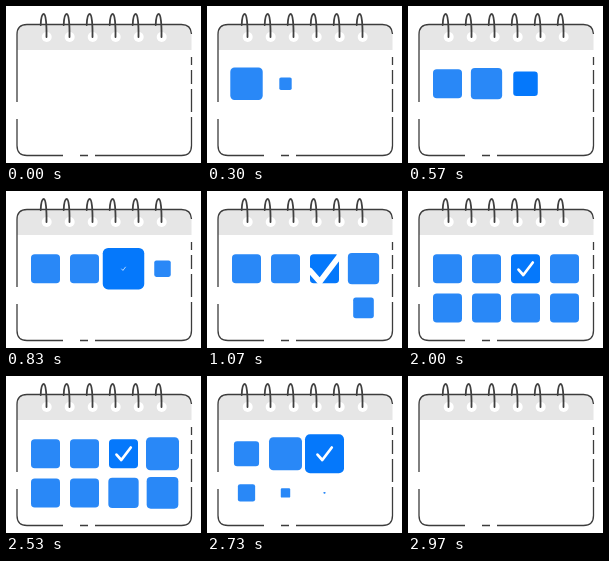
An HTML page that plays this animation: 195 by 157 pixels, repeating every 3010 ms.

```html
<!DOCTYPE html>
<html lang="en">
<head>
<meta charset="utf-8">
<title>Calendar</title>
<style>
  html, body { margin: 0; width: 100%; height: 100%; overflow: hidden; background: #fff; }
  svg { display: block; width: 195px; height: 157px; }
</style>
</head>
<body>
<svg viewBox="0 0 195 157" fill="none" stroke-linecap="round" stroke-linejoin="round">
  <path d="M11 44V28.500Q11 18.500 21 18.500H175.500Q185.500 18.500 185.500 28.500V44Z" fill="#e6e6e6"/>
  <g stroke="#3c3c3c" stroke-width="1.3" stroke-linecap="butt">
    <path d="M11 96V28.500Q11 18.500 21 18.500H175.500Q185 18.500 185.500 28"/>
    <path d="M185.500 51V59M185.500 64V78M185.500 83V106"/>
    <path d="M185.500 111V139.500Q185.500 149.500 175.500 149.500H89"/>
    <path d="M82 149.500H74M57 149.500H21Q11 149.500 11 139.500V113"/>
  </g>
  <g id="rings"></g>
  <g id="days"></g>
  <path id="tick" d="M-7 .8L-2.200 6.200L7.300 -6.300" stroke="#fff" stroke-width="2.700"/>
</svg>
<script>
const NS = 'http://www.w3.org/2000/svg';
const LOOP = 3010, STEP = 100 / 3, LAST = 89;
const SIZE = 29, PEAK = 33, BIG = 49;

function add(parent, tag, attrs) {
  const el = document.createElementNS(NS, tag);
  for (const key in attrs) el.setAttribute(key, attrs[key]);
  return document.getElementById(parent).appendChild(el);
}

// Linear interpolation through [step, value] pairs.
function track(keys, k) {
  if (k <= keys[0][0]) return keys[0][1];
  for (let i = 1; i < keys.length; i++) {
    const [a, from] = keys[i - 1], [b, to] = keys[i];
    if (k <= b) return from + (to - from) * (k - a) / (b - a);
  }
  return keys[keys.length - 1][1];
}

for (let i = 0; i < 6; i++) {
  const x = 40.7 + 23 * i;
  add('rings', 'circle', { cx: x, cy: 31, r: 5, fill: '#fff' });
  add('rings', 'path', {
    d: `M${x - 6} 19C${x - 5.7} 12 ${x - 4.600} 8 ${x - 3} 8C${x - 0.8} 8 ${x} 19 ${x - 0.2} 31`,
    stroke: '#404040', 'stroke-width': 1.8
  });
}

function day(col, row, start, leave, marked) {
  const peak = marked ? BIG : PEAK;
  const [rise, settle, swell, gone] = marked ? [10, 18, 4, 9] : [8, 15, 3, 7.2];
  return {
    x: 39.5 + 39 * col,
    y: 77.7 + 39.2 * row,
    keys: [[start, 0], [start + rise, peak], [start + settle, SIZE],
           [leave, SIZE], [leave + swell, peak], [leave + gone, 0]],
    el: add('days', 'rect', { fill: marked ? '#0578fb' : '#2988f7' })
  };
}

// column, row, appears, leaves
const days = [
  [0, 0, 0, 78], [1, 0, 6, 79], [3, 0, 21, 73], [3, 1, 27, 74],
  [2, 1, 33, 75], [1, 1, 39, 76], [0, 1, 45, 77], [2, 0, 12, 80, true]
].map(args => day(...args));

const tick = document.getElementById('tick');
const tickKeys = [[24, 0], [32, 2.1], [50, 1], [84, 1], [89, 0]];

function draw(k) {
  for (const { x, y, keys, el } of days) {
    const s = track(keys, k);
    el.setAttribute('x', x - s / 2);
    el.setAttribute('y', y - s / 2);
    el.setAttribute('width', s);
    el.setAttribute('height', s);
    el.setAttribute('rx', s * 0.13);
  }
  const scale = track(tickKeys, k);
  tick.setAttribute('transform', `translate(117.5 77.8) scale(${scale})`);
  tick.setAttribute('visibility', scale ? 'visible' : 'hidden');
}

const origin = performance.now();
function loop() {
  const t = Math.max(0, performance.now() - origin) % LOOP;
  draw(Math.min(LAST, Math.floor((t + 5) / STEP)));
  requestAnimationFrame(loop);
}
draw(0);
requestAnimationFrame(loop);
</script>
</body>
</html>
```
